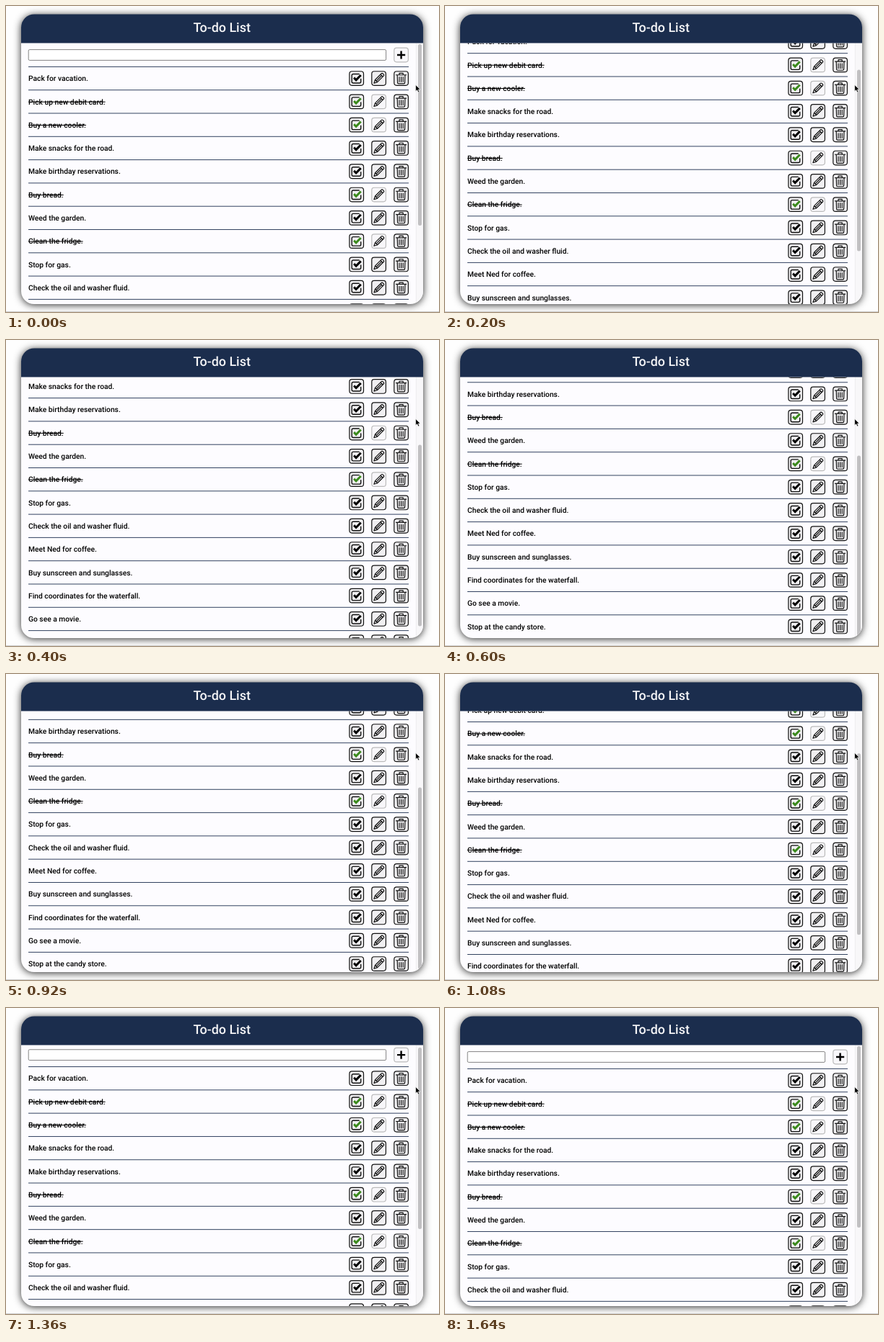
Recreate the animation shown at these times as an HTML page. Size 600x425 px, loop 1680 ms.

```html
<!DOCTYPE html>
<html lang="en">
<head>
<meta charset="utf-8">
<title>To-do List</title>
<style>
  html, body { margin: 0; width: 100%; height: 100%; overflow: hidden; background: #fefefe; }
  svg { position: absolute; left: 0; top: 0; width: 600px; height: 425px; }
  text { font-family: Roboto, sans-serif; font-weight: 500; text-rendering: geometricPrecision; }
  .card { position: absolute; left: 21px; top: 11.5px; width: 557px; height: 402.5px;
          border-radius: 18px; background: #fdfcff; box-shadow: 0 1px 11px rgba(0, 0, 0, .85); }
  .item { font-size: 10.25px; fill: #000; }
  .done { text-decoration: line-through; }
  .button { fill: #f0eff1; stroke: #111; stroke-width: 1.2; }
  .button.off { fill: #f8f7fa; stroke: #bbb; }
  .icon { fill: none; stroke: #111; stroke-width: 1.2; stroke-linejoin: round; stroke-linecap: round; }
  .rule { stroke: #1b2d4d; stroke-width: .9; }
</style>
</head>
<body>
<div class="card"></div>
<svg viewBox="0 0 600 425">
  <defs>
    <clipPath id="view"><path d="M21 51.5H578V396a18 18 0 0 1-18 18H39a18 18 0 0 1-18-18Z"/></clipPath>
    <g id="box" class="icon">
      <path d="M3.5-6H-4.5a2 2 0 0 0-2 2V4.5a2 2 0 0 0 2 2H4a2 2 0 0 0 2-2V1" stroke-width="1.4"/>
    </g>
    <path id="tick" d="M-3.6-.9-.6 2.2 6-4.6" fill="none" stroke-width="3"/>
    <g id="pencil" class="icon" transform="rotate(45)" stroke-width="1.1">
      <path d="M-2.2 5V-7.4a1.2 1.2 0 0 1 1.2-1.2H1a1.2 1.2 0 0 1 1.2 1.2V5L0 9.4ZM-2.2-5.6H2.2M-2.2 5H2.2M0-5.4V4.6"/>
    </g>
    <g id="bin" class="icon">
      <path d="M-7-4.8H7M-2.6-5V-7.2H2.6V-5M-5.4-4.6-5 6a1.4 1.4 0 0 0 1.4 1.4H3.6A1.4 1.4 0 0 0 5 6L5.4-4.6M-2.6-2V4.8M0-2V4.8M2.6-2V4.8"/>
    </g>
  </defs>
  <path d="M0 424.5H600" stroke="#cfcfcf"/>
  <g clip-path="url(#view)">
    <g id="list">
      <rect x="31.2" y="60.6" width="495.4" height="14.8" rx="1.5" fill="#fff" stroke="#777" stroke-width=".9"/>
      <rect class="button off" x="537.8" y="58.2" width="19.6" height="19.6" rx="3.5"/>
      <path d="M542 68H553.2M547.6 62.4V73.6" stroke="#000" stroke-width="2.4"/>
    </g>
    <path d="M568 51H578V414H568Z" fill="#f8f7f9"/>
    <path d="M568.4 51V414" stroke="#ebeaec" stroke-width=".8"/>
    <rect id="thumb" x="571" y="53" width="5" height="252" rx="2.5" fill="#c1c0c2"/>
  </g>
  <path d="M21 51.5V29.5a18 18 0 0 1 18-18H560a18 18 0 0 1 18 18V51.5Z" fill="#1b2d4d"/>
  <text x="299.2" y="36.3" text-anchor="middle" font-size="17.9" fill="#f5f5f7">To-do List</text>
  <path d="M567.6 109.4V118.6L569.7 116.7 571.2 120 572.8 119.3 571.4 116.1H574.2Z"
        fill="#000" stroke="#fff" stroke-width=".7"/>
</svg>
<script>
const items = [
  "Pack for vacation.", "-Pick up new debit card.", "-Buy a new cooler.",
  "Make snacks for the road.", "Make birthday reservations.", "-Buy bread.",
  "Weed the garden.", "-Clean the fridge.", "Stop for gas.",
  "Check the oil and washer fluid.", "Meet Ned for coffee.",
  "Buy sunscreen and sunglasses.", "Find coordinates for the waterfall.",
  "Go see a movie.", "Stop at the candy store."
];
const TOP = 84.4, PITCH = 32.3, LOOP = 1680, STEP = 40;
const list = document.getElementById("list");
const thumb = document.getElementById("thumb");

const button = (x, off, icon) => `<g transform="translate(${x} 0)">
  <rect class="button ${off ? "off" : ""}" x="-9.8" y="-9.8" width="19.6" height="19.6" rx="3.5"/>${icon}</g>`;

list.insertAdjacentHTML("beforeend", items.map((item, i) => {
  const done = item[0] === "-";
  const tick = `<use href="#box"/><use href="#tick" stroke="${done ? "#3b8a1c" : "#000"}"/>`;
  return `<g transform="translate(0 ${TOP + PITCH * (i + .5)})">
    <path class="rule" d="M31 ${-PITCH / 2}H558"/>
    <text class="item ${done ? "done" : ""}" x="31" y="3.7">${item.replace("-", "")}</text>
    ${button(485.7, false, tick)}
    ${button(516.6, done, '<use href="#pencil"/>')}
    ${button(547.6, false, '<use href="#bin"/>')}
  </g>`;
}).join(""));

// [time in ms, scroll offset in px]
const keys = [[0, 0], [80, 0], [120, 6], [200, 51], [400, 133], [600, 154.8],
  [880, 154.8], [920, 150.2], [1080, 82.5], [1240, 29.6], [1400, 0], [LOOP, 0]];

const slope = i => (keys[i + 1][1] - keys[i][1]) / (keys[i + 1][0] - keys[i][0]);

// Harmonic mean of neighbouring slopes keeps the curve monotone.
function tangent(i) {
  if (i === 0 || i === keys.length - 1) return 0;
  const a = slope(i - 1), b = slope(i);
  return a * b > 0 ? 2 * a * b / (a + b) : 0;
}

function scrollAt(t) {
  const i = keys.findIndex(k => k[0] > t) - 1;
  const [t0, y0] = keys[i], [t1, y1] = keys[i + 1];
  const d = t1 - t0, u = (t - t0) / d, v = 1 - u;
  return v * v * ((1 + 2 * u) * y0 + u * d * tangent(i))
       + u * u * ((1 + 2 * v) * y1 - v * d * tangent(i + 1));
}

function draw(now) {
  const y = scrollAt(Math.floor(now % LOOP / STEP) * STEP);
  list.setAttribute("transform", `translate(0 ${-y})`);
  thumb.setAttribute("y", 53 + y * .695);
  requestAnimationFrame(() => draw(performance.now()));
}
draw(performance.now());
</script>
</body>
</html>
```
